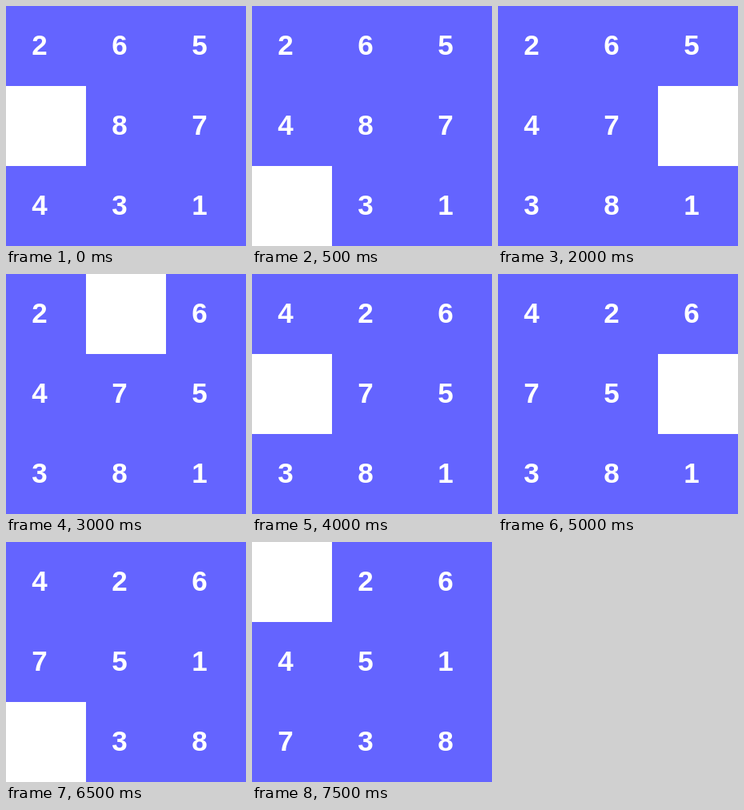
Write an HTML page with a canvas that moves like this. It is 300 by 300 pixels and loops after 8000 ms.

```html
<!DOCTYPE html>
<html>
<head>
<meta charset="utf-8">
<style>
  html, body { margin: 0; width: 100%; height: 100%; overflow: hidden; background: #fff; }
  canvas { display: block; }
</style>
</head>
<body>
<canvas id="board" width="300" height="300"></canvas>
<script>
const ctx = document.getElementById('board').getContext('2d');
const CELL = 100, STEP = 500;
const start = [2, 6, 5, 0, 8, 7, 4, 3, 1];
// Cells the gap visits, one per step
const path = [3, 6, 7, 4, 5, 2, 1, 0, 3, 4, 5, 8, 7, 6, 3, 0];

function tilesAt(step) {
  const tiles = [...start];
  for (let i = 1; i <= step; i++) {
    tiles[path[i - 1]] = tiles[path[i]];
    tiles[path[i]] = 0;
  }
  return tiles;
}

function draw(step) {
  ctx.fillStyle = '#fff';
  ctx.fillRect(0, 0, 300, 300);
  ctx.font = 'bold 35px "Liberation Sans", Arial, sans-serif';
  ctx.textAlign = 'center';
  tilesAt(step).forEach((n, i) => {
    if (!n) return;
    const x = i % 3 * CELL, y = Math.floor(i / 3) * CELL;
    ctx.fillStyle = '#6464ff';
    ctx.fillRect(x, y, CELL, CELL);
    ctx.fillStyle = '#fff';
    ctx.fillText(n, x + 42, y + 61);
  });
}

const origin = performance.now();
function tick() {
  draw(Math.floor((performance.now() - origin) / STEP) % path.length);
  requestAnimationFrame(tick);
}
tick();
</script>
</body>
</html>
```
